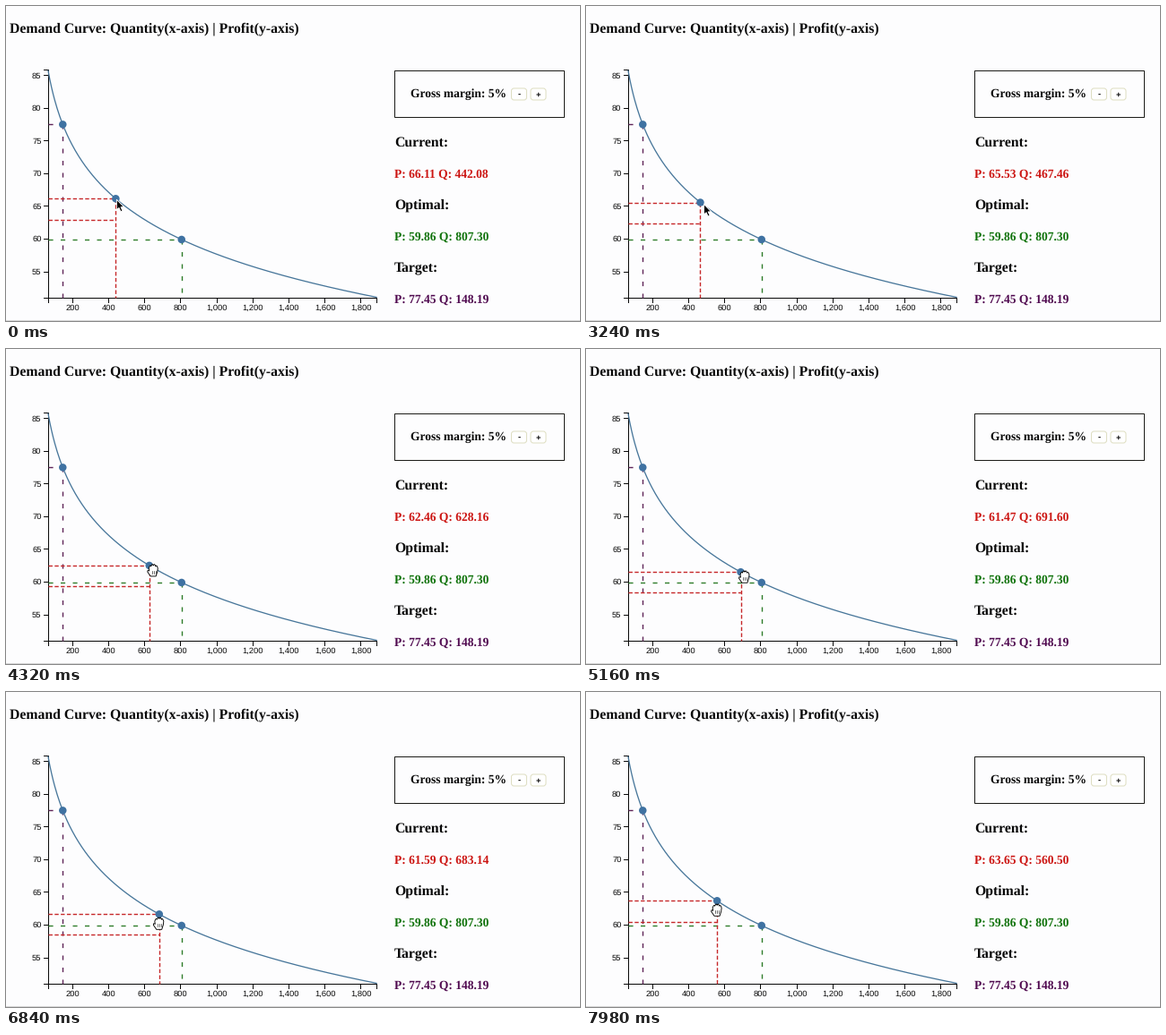
Recreate the animation shown at these times as a matplotlib script. Size 640x352 px, loop 8 s.

```python
import numpy as np
import matplotlib.pyplot as plt
from matplotlib.animation import FuncAnimation
from matplotlib.patches import Circle, FancyBboxPatch, Polygon, Rectangle

W, H, DPI = 640, 352, 100
PX = 72 / DPI
STEP, FRAMES = 40, 200

INK = "#080808"
RED, GREEN, PURPLE = "#cc1512", "#0f720a", "#500a50"
LEFT, RIGHT, TOP, BOTTOM = 47, 413, 70.5, 326
TICK = 5
HEAD, BODY, SMALL = 15.8, 13.54, 9.4
TARGET_Q, OPTIMAL_Q = 148.19, 807.30
START_Q, Q_STEP = 442.084, 4.2291
MARGIN = 0.05

plt.rcParams["text.hinting"] = "none"
fig = plt.figure(figsize=(W / DPI, H / DPI), dpi=DPI, facecolor="#fdfdfe")
ax = fig.add_axes([0, 0, 1, 1])
ax.set_xlim(0, W)
ax.set_ylim(H, 0)
ax.axis("off")


def price(q):
    return 129.328 - 10.378 * np.log(q)


def px(q):
    return 33.5 + 0.201 * q


def py(p):
    return 77.2 + (85 - p) * 7.31


def line(xs, ys, color=INK, width=1.0, dash=None, z=2):
    style = (0, [d / width for d in dash]) if dash else "-"
    return ax.plot(xs, ys, color=color, lw=width * PX, ls=style,
                   dash_capstyle="butt", zorder=z)[0]


def label(x, y, s, size, color=INK, **kw):
    font = dict(family="Liberation Serif", weight="bold") | kw
    return ax.text(x, y, s, fontsize=size * PX, color=color, va="baseline", **font)


def tick_label(x, y, s, ha):
    label(x, y, s, SMALL, family="Liberation Sans", weight="normal", ha=ha)


def dot(q, z=6):
    spot = Circle((px(q), py(price(q))), 4.25, fc="#3f72a2", ec="none", zorder=z)
    ax.add_patch(spot)
    return spot


def reading(q):
    return f"P: {price(q):.2f} Q: {q:.2f}"


# Heading and side panel
label(4.5, 29.5, "Demand Curve: Quantity(x-axis) | Profit(y-axis)", HEAD)
ax.add_patch(Rectangle((432.5, 71.5), 189, 52, fill=False, ec="#1c1c18", lw=PX))
label(451, 102, "Gross margin: 5%", BODY)
for x, sign in ((563.5, "-"), (585, "+")):
    ax.add_patch(FancyBboxPatch((x, 92), 17, 13, fc="white", ec="#dedec2", lw=PX,
                                boxstyle="round,pad=0,rounding_size=3"))
    label(x + 8.5, 102, sign, SMALL, family="Liberation Sans", ha="center")

panel = (("Current:", RED, START_Q), ("Optimal:", GREEN, OPTIMAL_Q),
         ("Target:", PURPLE, TARGET_Q))
readings = []
for row, (name, color, q) in enumerate(panel):
    y = 156.8 + 70.2 * row
    label(433, y, name, HEAD)
    readings.append(label(433, y + 34.7, reading(q), BODY, color))
current_text = readings[0]
line([0, W], [351, 351], "#d8d8d8")

# Axes
line([LEFT - TICK, LEFT, LEFT, LEFT - TICK], [TOP, TOP, BOTTOM, BOTTOM])
line([LEFT, LEFT, RIGHT, RIGHT], [BOTTOM + TICK, BOTTOM, BOTTOM, BOTTOM + TICK])
for q in range(200, 1801, 200):
    line([px(q)] * 2, [BOTTOM, BOTTOM + TICK])
    tick_label(px(q) + 0.5, 339.5, f"{q:,}", "center")
for p in range(55, 86, 5):
    line([LEFT - TICK, LEFT], [py(p)] * 2)
    tick_label(39.5, py(p) + 3.3, str(p), "right")

# Curve and fixed guides
xs = np.linspace(LEFT, RIGHT, 400)
line(xs, py(price((xs - px(0)) / 0.201)), "#47769a", 1.3, z=5)
for q, color in ((TARGET_Q, "#5e2458"), (OPTIMAL_Q, "#2f7d2a")):
    x, y = px(q), py(price(q))
    line([LEFT, x], [y, y], color, 1.4, (5.1, 8.4))
    line([x, x], [y, BOTTOM], color, 1.4, (5.1, 8.4))
    dot(q)

# Current point, dragged along the curve
price_line, cost_line, drop_line = (
    line([], [], "#c6282a", 1.4, (4.4, 2.4), z=4) for _ in range(3))
handle = dot(START_Q, 7)

# Cursor shapes around their hot spots
ARROW = np.array([(0, 0), (0, 11.5), (2.6, 9.2), (4.6, 13.5), (6.6, 12.6),
                  (4.7, 8.4), (8.2, 8.4)])
arm = np.array([(-.8, -.8), (-.8, -3.6), (-2.5, -3.6), (0, -6.2),
                (2.5, -3.6), (.8, -3.6), (.8, -.8)])
quarter = np.array([(0, 1), (-1, 0)])
MOVE = np.vstack([arm @ np.linalg.matrix_power(quarter, k) for k in range(4)])
u = np.linspace(0, 1, 41)
knuckles = np.column_stack([10 * u - 4.5, -2 - 3 * np.sin(np.pi * u)
                            - 1.5 * np.abs(np.sin(4 * np.pi * u))])
HAND = np.vstack([knuckles, [(5, 2), (3.4, 7), (-2.6, 7), (-6, 2), (-5.6, .4), (-4, 1)]])
CREASES = np.vstack([[(x, 1), (x, 4), (np.nan, np.nan)] for x in (-1.2, .8, 2.8)])

STYLES = {"arrow": (ARROW, "black", "white"),
          "move": (MOVE, "black", "white"),
          "hand": (HAND, "white", "black")}
# Start time, kind, offset from the handle
CURSORS = [(0, "arrow", 1, 1), (840, "move", 4, 7), (2480, "arrow", 4, 2),
           (3320, "hand", 4, 5), (5760, "arrow", 1, -1.5), (6440, "hand", -.5, 10)]

cursor = Polygon(ARROW, closed=True, zorder=9, joinstyle="round", lw=0.9 * PX)
ax.add_patch(cursor)
creases = line([], [], "#333333", 0.7, z=10)

# Pointer steps dragged so far, at a few moments
DRAG_T = [2500, 3200, 4320, 5600, 6000, 7280, 7400, 7960]
DRAG_N = [0, 5, 44, 67, 67, 52, 52, 28]


def update(i):
    t = i * STEP
    q = START_Q + Q_STEP * round(float(np.interp(t, DRAG_T, DRAG_N)))
    p = price(q)
    x, y, cost = px(q), py(p), py(p * (1 - MARGIN))
    handle.center = (x, y)
    price_line.set_data([LEFT, x], [y, y])
    cost_line.set_data([LEFT, x], [cost, cost])
    drop_line.set_data([x, x], [y, BOTTOM])
    current_text.set_text(reading(q))

    _, kind, dx, dy = [c for c in CURSORS if c[0] <= t][-1]
    shape, fill, edge = STYLES[kind]
    spot = np.array([x + dx, y + dy])
    cursor.set_xy(shape + spot)
    cursor.set(facecolor=fill, edgecolor=edge)
    creases.set_data(*(CREASES + spot).T)
    creases.set_visible(kind == "hand")
    return handle, price_line, cost_line, drop_line, current_text, cursor, creases


anim = FuncAnimation(fig, update, frames=FRAMES, interval=STEP,
                     init_func=lambda: update(0), repeat=True, repeat_delay=0)
plt.show()
```
